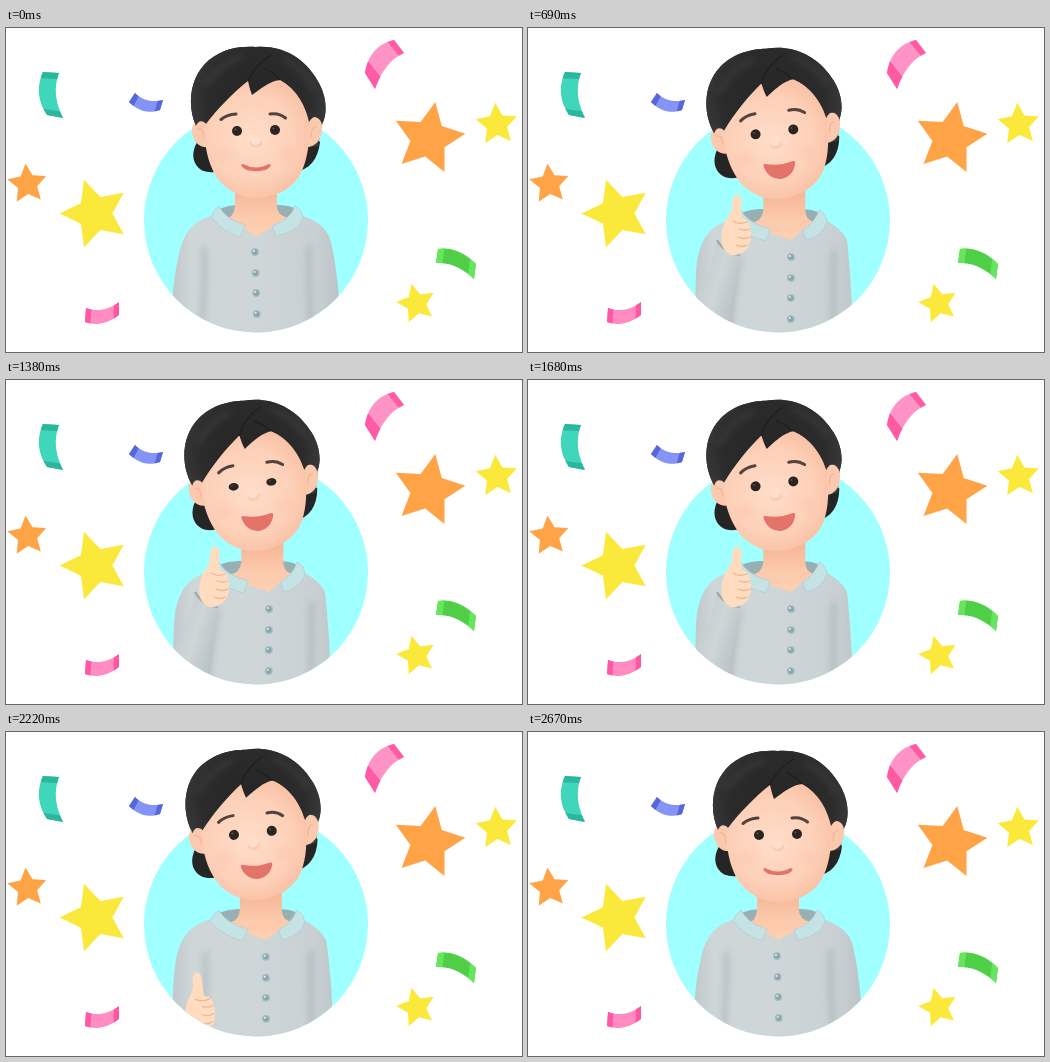
Write an HTML page that moves like this. It is 516 px wide and 324 px high and loops after 2.7 s.

```html
<!DOCTYPE html>
<html lang="en">
<head>
<meta charset="utf-8">
<title>Thumbs up</title>
<style>
  html, body { margin: 0; width: 100%; height: 100%; overflow: hidden; background: #fff; }
  svg { display: block; width: 516px; height: 324px; }
  .soft { filter: blur(3px); }
</style>
</head>
<body>
<svg viewBox="0 0 516 324">
  <defs>
    <clipPath id="frame"><path d="M0 0H516V192.500H362A112 112 0 0 1 138 192.500H0Z"/></clipPath>
    <radialGradient id="skin" gradientUnits="userSpaceOnUse" cx="246" cy="110" r="66">
      <stop offset="0" stop-color="#ffddc9"/><stop offset=".65" stop-color="#fdd0b8"/><stop offset="1" stop-color="#f9bfa2"/>
    </radialGradient>
    <radialGradient id="hair" gradientUnits="userSpaceOnUse" cx="252" cy="70" r="72">
      <stop offset="0" stop-color="#252526"/><stop offset=".7" stop-color="#2b2b2c"/><stop offset="1" stop-color="#3a3a3c"/>
    </radialGradient>
    <linearGradient id="shirt" gradientUnits="userSpaceOnUse" x1="165" y1="0" x2="335" y2="0">
      <stop offset="0" stop-color="#bfc7ca"/><stop offset=".12" stop-color="#cfd6d8"/>
      <stop offset=".5" stop-color="#cfd6d8"/><stop offset=".85" stop-color="#c9d0d3"/><stop offset="1" stop-color="#b9c2c5"/>
    </linearGradient>
    <linearGradient id="sleeve" gradientUnits="userSpaceOnUse" x1="170" y1="250" x2="208" y2="262">
      <stop offset="0" stop-color="#c4cccf"/><stop offset=".5" stop-color="#cfd6d8"/><stop offset="1" stop-color="#bcc5c8"/>
    </linearGradient>
    <linearGradient id="neck" x1="0" y1="0" x2="0" y2="1">
      <stop offset=".2" stop-color="#f6b697"/><stop offset=".6" stop-color="#fcc8ab"/><stop offset="1" stop-color="#fdd0b0"/>
    </linearGradient>
    <clipPath id="torso"><path class="body"/></clipPath>
  </defs>

  <g id="confetti"></g>
  <circle cx="250" cy="192.500" r="112" fill="#a0ffff"/>

  <g clip-path="url(#frame)">
    <g class="head" fill="#252526">
      <path d="M196 108C188 116 185 127 189 135C193 143 201 145 209 144L225 120Z"/>
      <path d="M288 144C303 142 312 132 314 114L300 100L284 130Z"/>
    </g>

    <path id="back" fill="#98b0b4"/>
    <path id="throat" fill="url(#neck)"/>
    <path class="body" fill="url(#shirt)"/>
    <g clip-path="url(#torso)">
      <path id="folds" class="soft" fill="none" stroke="#98a5a9" stroke-width="4" opacity=".6"/>
    </g>
    <g id="collar" fill="#c5e2e5" stroke="#b2ced2" stroke-width=".8" stroke-linejoin="round"><path/><path/></g>
    <g id="buttons"></g>

    <g class="head">
      <path fill="url(#hair)" d="M190 98C181 78 183 49 203 32C219 19 238 18 250 19C282 17 303 35 314 57C321 71 321 86 316 97L312 118L296 120L296 60Z"/>
      <path fill="#fbc9ad" d="M201 94C193 89 185 94 186 104C187 114 194 121 204 119Z"/>
      <path fill="#fbc9ad" d="M302 91C310 86 317 91 316 102C315 113 309 119 300 119Z"/>
      <path d="M192 101Q198 100 198 110M310 99Q305 99 305 109" fill="none" stroke="#f3b79a" stroke-width="1.500" stroke-linecap="round"/>
      <path fill="url(#skin)" d="M198 95C198 119 203 146 220 159C231 168 241 170 252 170C270 169 286 161 294 147C302 132 304 112 303 95C301 63 272 42 240 46C216 58 200 78 198 95Z"/>
      <ellipse class="soft" cx="219" cy="127" rx="10" ry="7" fill="#f9b699" opacity=".2"/>
      <ellipse class="soft" cx="281" cy="126" rx="10" ry="7" fill="#f9b699" opacity=".2"/>
      <ellipse cx="250" cy="115" rx="6" ry="4.500" fill="#f8bfa2" opacity=".55"/>
      <ellipse cx="249.500" cy="112" rx="5" ry="5" fill="#ffdfcc"/>

      <path fill="url(#hair)" d="M190 98C181 78 183 49 203 32C219 19 238 18 250 19C282 17 303 35 314 57C321 71 321 86 317 94C313 87 307 87 303 94C300 79 291 61 274 52C264 53 254 61 246 67C244 62 243 57 242 53C228 64 212 80 200 96C197 92 192 92 190 98Z"/>
      <path d="M242 53C246 43 255 33 266 27M274 52C268 46 264 42 258 40" fill="none" stroke="#19191a" stroke-width="1.200" opacity=".7"/>
      <path class="soft" d="M200 58C208 43 221 33 237 28M276 30C290 37 301 47 307 62" fill="none" stroke="#59595c" stroke-width="5" opacity=".3"/>

      <g id="brows" fill="none" stroke="#51443f" stroke-width="3" stroke-linecap="round">
        <path d="M215 91.500Q221 86.500 230 86"/><path d="M264 86Q273 84.500 279.500 90"/>
      </g>
      <g class="eye"><circle r="5" fill="#2a2423"/><circle cx="-1.500" cy="-1.600" r=".8" fill="#6b6361"/></g>
      <g class="eye"><circle r="5" fill="#2a2423"/><circle cx="-1.500" cy="-1.600" r=".8" fill="#6b6361"/></g>
      <path id="mouth" fill="#e4736a" stroke="#e4736a" stroke-width="3" stroke-linejoin="round"/>
    </g>

    <g id="arm">
      <path class="soft" d="M212 228C207 255 204 280 201 306" fill="none" stroke="#8f9ca0" stroke-width="4" opacity=".5"/>
      <path fill="url(#sleeve)" d="M189 212C186 230 180 248 169 266C165 288 172 305 185 312L200 308C203 280 206 255 212 227Z"/>
      <path d="M189 212Q196 225 212 227" fill="none" stroke="#a3aeb1" stroke-width="2.500"/>
      <path fill="#ffdcc0" d="M195 199C192 210 192 222 203 227C214 228 222 221 223 209C223 198 222 192 214 190C212 181 216 171 211 167C207 164 204 170 204 178C203 188 197 191 195 199Z"/>
      <path d="M205 193Q211 197 219 194M211 201Q217 203 222 201M210 209Q216 212 222 209M208 217Q214 220 219 217" fill="none" stroke="#edb793" stroke-width="1.300" stroke-linecap="round"/>
    </g>
  </g>
</svg>

<script>
const LOOP = 2700;
const $ = s => document.querySelector(s);
const all = s => [...document.querySelectorAll(s)];
const set = (el, k, v) => el.setAttribute(k, v);

function add(parent, tag, attrs) {
  const el = document.createElementNS('http://www.w3.org/2000/svg', tag);
  for (const k in attrs) set(el, k, attrs[k]);
  return parent.appendChild(el);
}

const confetti = $('#confetti');
const poly = (pts, fill) => add(confetti, 'polygon', { points: pts.join(' '), fill });

function star(x, y, r, turn, fill) {
  const pts = [];
  for (let i = 0; i < 10; i++) {
    const a = (turn + i * 36 - 90) * Math.PI / 180, d = i % 2 ? r * 0.49 : r;
    pts.push([x + d * Math.cos(a), y + d * Math.sin(a)]);
  }
  poly(pts, fill);
}

// Curved strip between two quadratic edges, with ends in a second tone.
function ribbon(a, b, fill, cap, start, end) {
  const at = (e, t) => [0, 1].map(i =>
    (1 - t) ** 2 * e[i] + 2 * t * (1 - t) * e[i + 2] + t * t * e[i + 4]);
  const strip = (from, to, color) => {
    const pts = [];
    for (let i = 0; i <= 12; i++) pts.push(at(a, from + (to - from) * i / 12));
    for (let i = 12; i >= 0; i--) pts.push(at(b, from + (to - from) * i / 12));
    poly(pts, color);
  };
  strip(0, 1, fill);
  strip(0, start, cap);
  strip(1 - end, 1, cap);
}

star(21.3, 156, 20.6, -5, '#ffa347');
star(89, 185.5, 35.5, -18, '#fae93a');
star(422.5, 110.5, 37.2, 10.5, '#ffa347');
star(490.8, 96.5, 21.7, -4, '#fae93a');
star(410.4, 275.5, 20.3, -14, '#fae93a');
ribbon([37, 44, 27, 66, 41, 87], [53, 45, 45, 66, 57, 90], '#40d6bc', '#2cb69e', 0.14, 0.14);
ribbon([129, 65, 140, 76, 157, 72], [123, 74, 137, 88, 154, 82], '#8394f6', '#5767da', 0.16, 0.16);
ribbon([359, 45, 363, 18, 388, 12], [369, 61, 379, 33, 398, 25], '#ff93c6', '#ff5ba5', 0.24, 0.14);
ribbon([80, 280, 97, 286, 113, 274], [79, 294, 96, 300, 113, 287], '#ff8bc1', '#ff57a3', 0.16, 0.16);
ribbon([432, 221, 452, 218, 470, 236], [430, 235, 450, 234, 468, 251], '#4fcf47', '#66e65c', 0.16, 0.16);

const dots = [224, 245, 265, 286].map(y => {
  const g = add($('#buttons'), 'g', {});
  add(g, 'circle', { r: 4, fill: '#a9bfc4' });
  add(g, 'circle', { r: 2.7, fill: '#88a7ae' });
  add(g, 'circle', { cx: -1, cy: -1, r: 1.1, fill: '#dceaec' });
  return { g, y };
});

// Rows: time, then values, eased between rows.
const REST = [0, 0, 0, 0, 0, 0, 0, 0];
const UP = [3.5, 1, -6, 14, 4, 3, -10, 1];
const tracks = {
  // head x, head y, head turn, chest x, chest y, left side, right side, brows
  pose: [[90, ...REST], [600, ...UP], [2100, ...UP], [2400, 0, -7, -2, 5, -7, -2, -3, 0], [2650, ...REST]],
  // mouth x, y, half width, upper curve, lower curve
  mouth: [[350, 250, 137.5, 13, 7, 5.5], [570, 251.5, 135, 14.5, 4, 18], [2130, 251.5, 135, 14.5, 4, 18],
          [2400, 250, 135, 14, 4, 12], [2640, 250, 137.5, 13, 7, 5.5]],
  arm: [[370, 0], [600, 1], [2100, 1], [2340, 0]],
  blink: [[1350, 1], [1440, 0.1], [1530, 1]]
};

function sample(rows, t) {
  const i = rows.findIndex(r => r[0] > t);
  if (i === 0) return rows[0].slice(1);
  if (i < 0) return rows[rows.length - 1].slice(1);
  const a = rows[i - 1], b = rows[i], u = (t - a[0]) / (b[0] - a[0]), e = u * u * (3 - 2 * u);
  return a.slice(1).map((v, k) => v + (b[k + 1] - v) * e);
}

const heads = all('.head'), bodies = all('.body'), eyes = all('.eye');
const flaps = all('#collar path');
const parts = { back: $('#back'), throat: $('#throat'), folds: $('#folds'),
                brows: $('#brows'), mouth: $('#mouth'), arm: $('#arm') };

function draw(t) {
  const [hx, hy, turn, bx, by, l, r, brow] = sample(tracks.pose, t);
  const [mx, my, mw, top, low] = sample(tracks.mouth, t);
  const [arm] = sample(tracks.arm, t);
  const [open] = sample(tracks.blink, t);
  const p = (x, y) => `${x.toFixed(2)} ${(y + by).toFixed(2)} `;
  // How far the chest turn carries the collar tip, neck, collar front, rim and shoulders.
  const tip = bx * 0.85, neck = bx * 0.45, n = bx * 0.25, w = bx * 0.15, sl = -bx * 0.25, sr = r * 0.4;

  heads.forEach(h => set(h, 'transform', `translate(${hx} ${hy}) rotate(${turn} 250 170)`));
  eyes.forEach((e, i) => set(e, 'transform', `translate(${231 + 38 * i} ${103 - i + (1 - open) * 2}) scale(1 ${open})`));
  set(parts.brows, 'transform', `translate(${2.5 * brow} ${-3.5 * brow})`);
  set(parts.mouth, 'd', `M${mx - mw} ${my}Q${mx} ${my + top} ${mx + mw} ${my}` +
    `C${mx + mw * 0.75} ${my + low} ${mx - mw * 0.75} ${my + low} ${mx - mw} ${my}Z`);

  const body = 'M' + p(209 - w, 187) + 'C' + p(188 + sl, 191) + p(178 + sl, 204) + p(173 + sl, 226) +
    'C' + p(168 + sl * 0.5, 248) + p(165 + l, 268) + p(165 + l, 330) + 'L' + p(335 + r, 330) +
    'C' + p(335 + r, 268) + p(329 + r * 0.8, 225) + p(323 + sr, 208) +
    'C' + p(317 + sr, 196) + p(306 + sr, 191) + p(294 + w, 187) +
    'L' + p(268 + neck, 198) + 'L' + p(251 + tip, 208) + 'L' + p(236 + n, 200) + 'Z';
  bodies.forEach(b => set(b, 'd', body));

  set(parts.back, 'd', 'M' + p(208 - w, 187) + 'Q' + p(212, 178) + p(232, 177) + 'L' + p(272, 177) +
    'Q' + p(291 + w, 177) + p(296 + w, 188) + 'L' + p(251 + tip, 209) + 'Z');
  set(parts.throat, 'd', 'M' + p(229 + neck, 150) + 'L' + p(229 + neck, 178) + 'Q' + p(228 + neck, 189) + p(220 + n, 191) +
    'L' + p(238 + n, 206) + 'L' + p(251 + tip, 209) + 'L' + p(270 + neck, 202) + 'L' + p(282 + n, 190) +
    'Q' + p(271 + neck, 187) + p(271 + neck, 178) + 'L' + p(271 + neck, 150) + 'Z');
  set(flaps[0], 'd', 'M' + p(205 - w, 189) + 'Q' + p(207, 182) + p(213, 178) +
    'Q' + p(219, 191) + p(239 + n, 197) + 'L' + p(234 + n, 209) + 'Q' + p(217, 204) + p(205 - w, 189) + 'Z');
  set(flaps[1], 'd', 'M' + p(289 + w, 178) + 'Q' + p(296 + w, 181) + p(297 + w, 190) +
    'Q' + p(293 + w, 203) + p(270 + bx * 0.6, 208) + 'L' + p(266 + bx * 0.6, 198) +
    'Q' + p(285 + w, 191) + p(289 + w, 178) + 'Z');

  set(parts.folds, 'd', 'M' + p(198 + l, 220) + 'Q' + p(200 + l, 255) + p(194 + l, 312) +
    'M' + p(303 + bx * 0.2, 218) + 'Q' + p(302 + bx * 0.2, 255) + p(306, 312));
  dots.forEach(({ g, y }, i) => set(g, 'transform', `translate(${249 + i * 0.6 + bx * (1 - i * 0.05)} ${y + by + bx / 14})`));

  set(parts.arm, 'transform', `translate(${(arm - 1) * 10} ${(1 - arm) * 150}) rotate(${(arm - 1) * 12} 185 290)`);
  set(parts.arm, 'visibility', arm > 0 ? 'visible' : 'hidden');
}

const start = performance.now();
function tick() {
  draw((performance.now() - start) % LOOP);
  requestAnimationFrame(tick);
}
tick();
</script>
</body>
</html>
```
